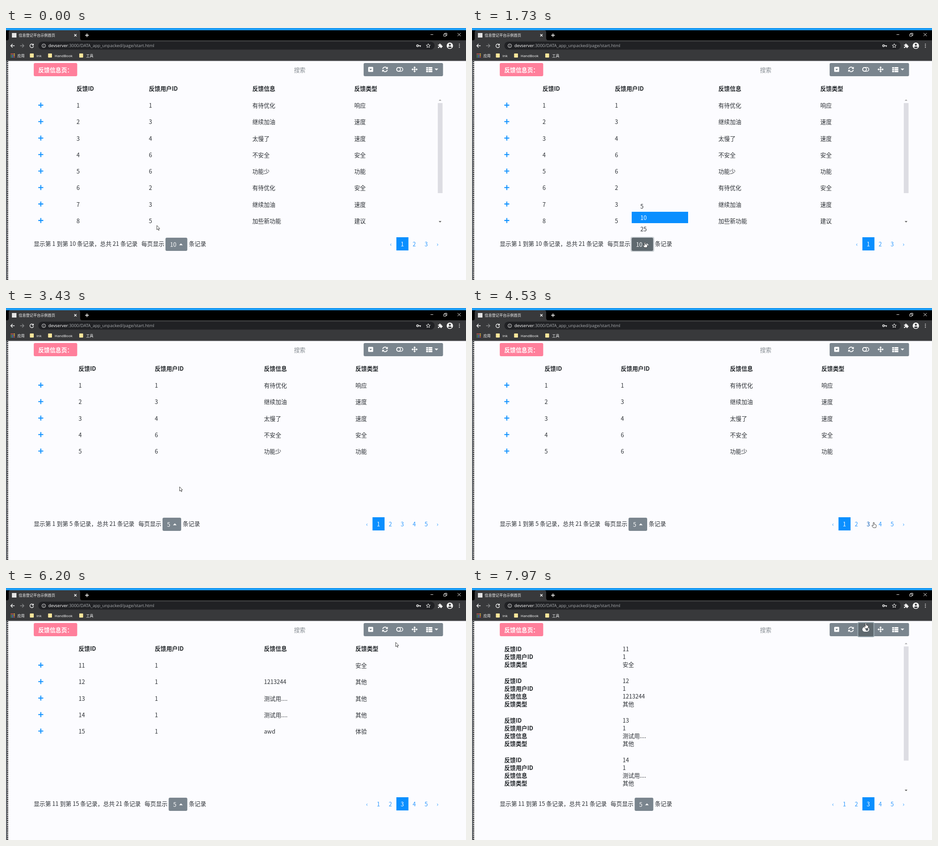
An HTML page for the animation above (8000 ms loop, 1011 by 554 pixels).

```html
<!DOCTYPE html>
<html lang="zh-CN">
<head>
<meta charset="utf-8">
<style>
html, body { margin: 0; width: 100%; height: 100%; overflow: hidden; background: #fcfcff; }
svg { display: block; width: 100vw; height: 100vh; }
text { font: 12.6px "Noto Sans CJK SC", "Noto Sans CJK", sans-serif; fill: #2b2f34; }
.bold { font-weight: 700; fill: #212529; }
.white { fill: #fff; font-weight: 500; }
.title { fill: #fff; font-weight: 700; }
.link { fill: #2b98ff; }
.hover { fill: #0056b3; }
.muted { fill: #858c92; }
.tiny { font-size: 8px; font-weight: 500; fill: #fff; }
.latin { font-family: "Open Sans", sans-serif; }
.url { font: 9.45px "Open Sans", sans-serif; fill: #a9acaf; }
</style>
</head>
<body>
<svg viewBox="0 0 1011 554">
  <g id="chrome"></g>
  <g id="page"></g>
  <path id="cursor" fill="#fff" stroke="#333" stroke-width=".9" stroke-linejoin="round"/>
</svg>
<script>
const LOOP = 8000;
const BLUE = '#0a8fff', GRAY = '#7a858e', DARK = '#5f696f', BAR = '#38393b';
const $ = id => document.getElementById(id);

// cy is the vertical centre of the line
const text = (x, cy, s, cls = '', extra = '') =>
  `<text x="${x}" y="${cy + 4.6}" class="${cls}" ${extra}>${s}</text>`;
const centered = (x, cy, s, cls) => text(x, cy, s, cls, 'text-anchor="middle"');
const tiny = (x, cy, s, cls = '') => `<text x="${x}" y="${cy + 3}" class="tiny ${cls}">${s}</text>`;
const rect = (x, y, w, h, fill, r = 0, extra = '') =>
  `<rect x="${x}" y="${y}" width="${w}" height="${h}" rx="${r}" fill="${fill}" ${extra}/>`;
const fillPath = (x, y, d, color = '#fff') => `<path transform="translate(${x} ${y})" d="${d}" fill="${color}"/>`;
const linePath = (x, y, d, color = '#fff', w = 1.2) =>
  `<path transform="translate(${x} ${y})" d="${d}" fill="none" stroke="${color}" stroke-width="${w}"/>`;
const circle = (x, y, r, fill, extra = '') => `<circle cx="${x}" cy="${y}" r="${r}" fill="${fill}" ${extra}/>`;
const ring = (x, y, w, h, color) =>
  rect(x - 1, y - 1, w + 2, h + 2, 'none', 3, `stroke="${color}" stroke-width="2.2"`);

const PLUS = 'M-5.5 0H5.5M0 -5.5V5.5';
const CARET_UP = 'M-4 2L0 -2 4 2Z', CARET_DOWN = 'M-4 -2L0 2 4 -2Z';

function drawChrome() {
  const folder = x => rect(x, 56, 8.5, 9, '#fbe69a', 1);
  const apps = ['#e8594d', '#e8594d', '#f2bd42', '#58a55c', '#5383ec', '#f2bd42', '#58a55c', '#5383ec', '#e8594d']
    .map((c, i) => rect(10.5 + i % 3 * 3.3, 56 + (i / 3 | 0) * 3.3, 2.2, 2.2, c)).join('');
  return rect(0, 0, 1011, 5, '#1c9bf3') + rect(0, 5, 1011, 22, '#000') +
    `<path d="M4 27Q6 26 6 22V9Q6 5 10 5H159Q163 5 163 9V22Q163 26 166 27Z" fill="${BAR}"/>` +
    rect(0, 27, 1011, 45, BAR) + rect(0, 71.5, 1011, 1, '#55565a') +
    rect(13, 11, 10, 10, '#e4e4e4') + tiny(28, 16, '信息登记平台示例首页') +
    linePath(152.5, 16, 'M-2.5 -2.5L2.5 2.5M2.5 -2.5L-2.5 2.5') +
    linePath(178, 16, 'M-4 0H4M0 -4V4', '#fff', 1.4) +
    linePath(936, 14.5, 'M-3 0H3', '#ddd', 1) +
    linePath(965, 14.5, 'M-3 -1H2V3.5H-3ZM-1 -1V-3H4V2H2', '#eee', 1) +
    linePath(996, 14.5, 'M-3.5 -3.5L3.5 3.5M3.5 -3.5L-3.5 3.5', '#eee', 1) +
    linePath(14.5, 39, 'M4.5 0H-4M0 -4L-4 0 0 4', '#eee', 1.4) +
    linePath(35.5, 39, 'M-4.5 0H4M0 -4L4 0 0 4', '#858688', 1.3) +
    linePath(56.5, 39, 'M3 -2.5A4 4 0 1 0 4 1', '#eee', 1.4) + fillPath(56.5, 39, 'M4.5 -5V-.5H0Z', '#eee') +
    rect(71, 30, 871, 17.5, '#202124', 8.7) +
    circle(83, 39, 4, 'none', 'stroke="#ddd"') + linePath(83, 39, 'M0 -2.2V-1M0 -.3V2.3', '#ddd', 1) +
    '<text x="93" y="42.2" class="url"><tspan fill="#fff">devserver</tspan>:3000/DATA_app_unpacked/page/start.html</text>' +
    circle(904.5, 39, 2, 'none', 'stroke="#eee" stroke-width="1.5"') + linePath(907, 39, 'M0 0H5M3.5 0V2.5', '#eee', 1.6) +
    linePath(928, 39, 'M0 -4.4L1.3 -1.4 4.4 -1.2 2 .9 2.8 4 0 2.3 -2.8 4 -2 .9 -4.4 -1.2 -1.3 -1.4Z', '#eee', 1) +
    fillPath(954, 39, 'M-4.5 -2.5H-1.8A1.6 1.6 0 1 1 1.2 -2.5H3.5V0A1.5 1.5 0 1 1 3.5 2.8V5H.8A1.5 1.5 0 1 0 -2 5H-4.5V2.2A1.5 1.5 0 1 0 -4.5 -.3Z', '#f2f2f2') +
    circle(975.5, 39, 7, '#f5f5f5') + circle(975.5, 36.7, 2.2, BAR) + fillPath(975.5, 42, 'M-4.4 .5Q0 -3.5 4.4 .5Q0 4.5 -4.4 .5Z', BAR) +
    [-3.5, 0, 3.5].map(d => circle(996.5, 39 + d, 1, '#eee')).join('') +
    apps + tiny(25, 60.5, '应用') + folder(52.5) + tiny(67, 60.5, 'ink', 'latin') +
    folder(92.5) + tiny(107, 60.5, 'HandBook', 'latin') + folder(161) + tiny(176, 60.5, '工具') +
    rect(0, 72, 2, 482, '#60646b') +
    '<path d="M3.5 73V554" stroke="#161616" stroke-width="2.6" stroke-dasharray="2.6 1.6"/>';
}

function toolbar({ toggleHover, toggleFocus, cards }) {
  const toggle = cards
    ? rect(858, 86, 15, 10, '#fff', 5) + circle(868, 91, 3.1, DARK)
    : rect(858.5, 86.8, 13.6, 8.4, 'none', 4.2, 'stroke="#fff" stroke-width="1.6"') +
      circle(862.8, 91, 4.1, 'none', 'stroke="#fff" stroke-width="1.6"');
  return rect(786, 77, 174.5, 29, GRAY, 3) +
    (toggleHover ? rect(849, 77, 33.5, 29, DARK) : '') +
    (toggleFocus ? ring(849, 77, 33.5, 29, '#94a3aa') : '') +
    rect(796, 85.5, 11, 11, '#fff', 1.5) + fillPath(801.5, 91.2, 'M-3 -1.5H3L0 2Z', GRAY) +
    linePath(833, 91, 'M-5 -.8A5 5 0 0 1 4 -3M5 .8A5 5 0 0 1 -4 3', '#fff', 1.8) +
    fillPath(833, 91, 'M6.2 -6V-1H1.2ZM-6.2 6V1H-1.2Z') + toggle +
    linePath(898, 91, 'M-5 0H5M0 -5V5', '#fff', 1.7) +
    fillPath(898, 91, 'M0 -6.8L2.8 -3.6H-2.8ZM0 6.8L2.8 3.6H-2.8ZM-6.8 0L-3.6 -2.8V2.8ZM6.8 0L3.6 -2.8V2.8Z') +
    [86, 90, 94].map(y => rect(923.5, y, 4, 3.2, '#fff') + rect(928.5, y, 8.5, 3.2, '#fff')).join('') +
    fillPath(946, 91.2, CARET_DOWN);
}

const HEADS = ['反馈ID', '反馈用户ID', '反馈信息', '反馈类型'];
const FIRST = [
  [1, 1, '有待优化', '响应'], [2, 3, '继续加油', '速度'], [3, 4, '太慢了', '速度'], [4, 6, '不安全', '安全'],
  [5, 6, '功能少', '功能'], [6, 2, '有待优化', '安全'], [7, 3, '继续加油', '速度'], [8, 5, '加些新功能', '建议']];
const THIRD = [
  [11, 1, '', '安全'], [12, 1, '1213244', '其他'], [13, 1, '测试用....', '其他'],
  [14, 1, '测试用....', '其他'], [15, 1, 'awd', '体验']];

const scrollbar = (top, thumbHeight, bottom) =>
  fillPath(954, top, 'M-3 1.5L0 -1.5 3 1.5Z', '#a5a5a8') + rect(949, top + 6.5, 10.5, thumbHeight, '#dddde3') +
  fillPath(954, bottom, 'M-3 -1.5L0 1.5 3 -1.5Z', '#505050');

function table(rows, cols) {
  return HEADS.map((h, i) => text(cols[i], 133.5, h, 'bold')).join('') +
    rows.map((row, r) => {
      const y = 170.6 + r * 36.22;
      return linePath(76.5, y - 1, PLUS, BLUE, 2.1) + row.map((v, i) => text(cols[i], y, v)).join('');
    }).join('');
}

function cardList(rows) {
  const tops = [134, 204, 291, 378];
  return tops.map((top, r) => HEADS.map((h, i) => [h, rows[r][i]]).filter(([, v]) => v !== '')
    .map(([h, v], i) => text(71, top + i * 17, h, 'bold') + text(331, top + i * 17, v)).join('')).join('') +
    scrollbar(122, 251, 445);
}

function footer({ from, to, size, x, width, sizeHover, sizeFocus, pages, current, linkHover, linkFocus }) {
  const first = 923.5 - (pages - 1) * 26.25;
  let out = text(61, 474.5, `显示第 ${from} 到第 ${to} 条记录，总共 21 条记录`) + text(x - 53, 474.5, '每页显示') +
    rect(x, 461, width, 29, sizeHover ? DARK : GRAY, 3) + (sizeFocus ? ring(x, 461, width, 29, '#ccd1d5') : '') +
    text(x + 10, 476, size, 'white') + fillPath(x + width - 14, 475.5, CARET_UP) + text(x + width + 3.5, 474.5, '条记录');
  for (let p = 1; p <= pages; p++) {
    const px = first + (p - 1) * 26.25;
    if (p === current) out += rect(px - 13, 460, 26.5, 29, BLUE);
    if (p === linkFocus) out += ring(px - 13, 460, 26.5, 29, '#bfdfff');
    out += centered(px, 475, p, p === current ? 'white' : p === linkHover ? 'hover' : 'link');
  }
  return out + centered(first - 25, 475, '‹', 'link') + centered(948.5, 475, '›', 'link');
}

const menu = () => rect(351, 404, 124, 25, BLUE) +
  [5, 10, 25].map((n, i) => text(370, 392 + i * 25, n, i === 1 ? 'white' : '')).join('');

function stateAt(t) {
  const between = (a, b) => t >= a && t < b;
  const short = t >= 3100, third = t >= 5200;
  return {
    third, cards: t >= 7270, menu: between(1700, 3100),
    toggleHover: t >= 6400, toggleFocus: t >= 7270,
    sizeHover: between(1250, 3100), sizeFocus: between(1700, 3100),
    from: third ? 11 : 1, to: third ? 15 : short ? 5 : 10, size: short ? 5 : 10,
    x: third ? 357.5 : short ? 344 : 350.5, width: short ? 41 : 48,
    pages: short ? 5 : 3, current: third ? 3 : 1,
    linkHover: between(4440, 5200) ? 3 : 0, linkFocus: between(4940, 5200) ? 3 : 0
  };
}

function drawPage(s) {
  const wide = s.size === 10;
  const body = s.cards ? cardList(THIRD)
    : wide ? table(FIRST, [155, 314, 541.5, 765.5]) + scrollbar(158.5, 198, 426)
    : table(s.third ? THIRD : FIRST.slice(0, 5), [159.5, 327, 567, 768]);
  return rect(61, 77, 95.5, 29, '#ff7f9b', 3) + text(71, 92, '反馈信息页：', 'title') +
    text(633, 92.5, '搜索', 'muted') + toolbar(s) + body + footer(s) + (s.menu ? menu() : '');
}

const ARROW = 'M0 0V9.5L2.2 7.5 3.8 11 5.2 10.4 3.7 7H6.6Z';
const HAND = 'M-1.1 1Q0 -.8 1.1 1V4.5L5 5.8Q6 6.5 5.5 8.5L4.5 12H-1L-4 8Q-4.2 5.8 -1.1 7.8Z';
const TRACK = [ // time, x, y
  [0, 331.5, 434], [30, 331.5, 434], [1000, 402.5, 452], [1500, 380, 471], [1700, 380, 471], [2400, 385.5, 424.5],
  [2500, 385.5, 424.5], [2870, 382, 389], [3100, 382, 389], [3400, 381.5, 393], [3670, 381.5, 393],
  [4470, 883, 471], [4530, 883, 471], [4730, 876, 471], [5770, 876, 471], [6200, 856.5, 119.5],
  [6570, 861, 90], [7040, 865.5, 77], [LOOP, 865.5, 77]];

function cursorAt(t) {
  const i = TRACK.findIndex(k => k[0] > t);
  const [t0, x0, y0] = TRACK[i - 1], [t1, x1, y1] = TRACK[i];
  const u = (t - t0) / (t1 - t0), e = u * u * (3 - 2 * u);
  return [x0 + (x1 - x0) * e, y0 + (y1 - y0) * e];
}

let shown = '';
function frame(now) {
  const t = now % LOOP, state = stateAt(t), key = JSON.stringify(state);
  if (key !== shown) {
    $('page').innerHTML = drawPage(state);
    shown = key;
  }
  const pointing = state.sizeHover || state.linkHover || state.toggleHover || (t >= 5200 && t < 5800);
  $('cursor').setAttribute('d', pointing ? HAND : ARROW);
  $('cursor').setAttribute('transform', `translate(${cursorAt(t)})`);
}

$('chrome').innerHTML = drawChrome();
const start = performance.now();
function tick(now) {
  frame(Math.max(0, now - start));
  requestAnimationFrame(tick);
}
requestAnimationFrame(tick);
</script>
</body>
</html>
```
